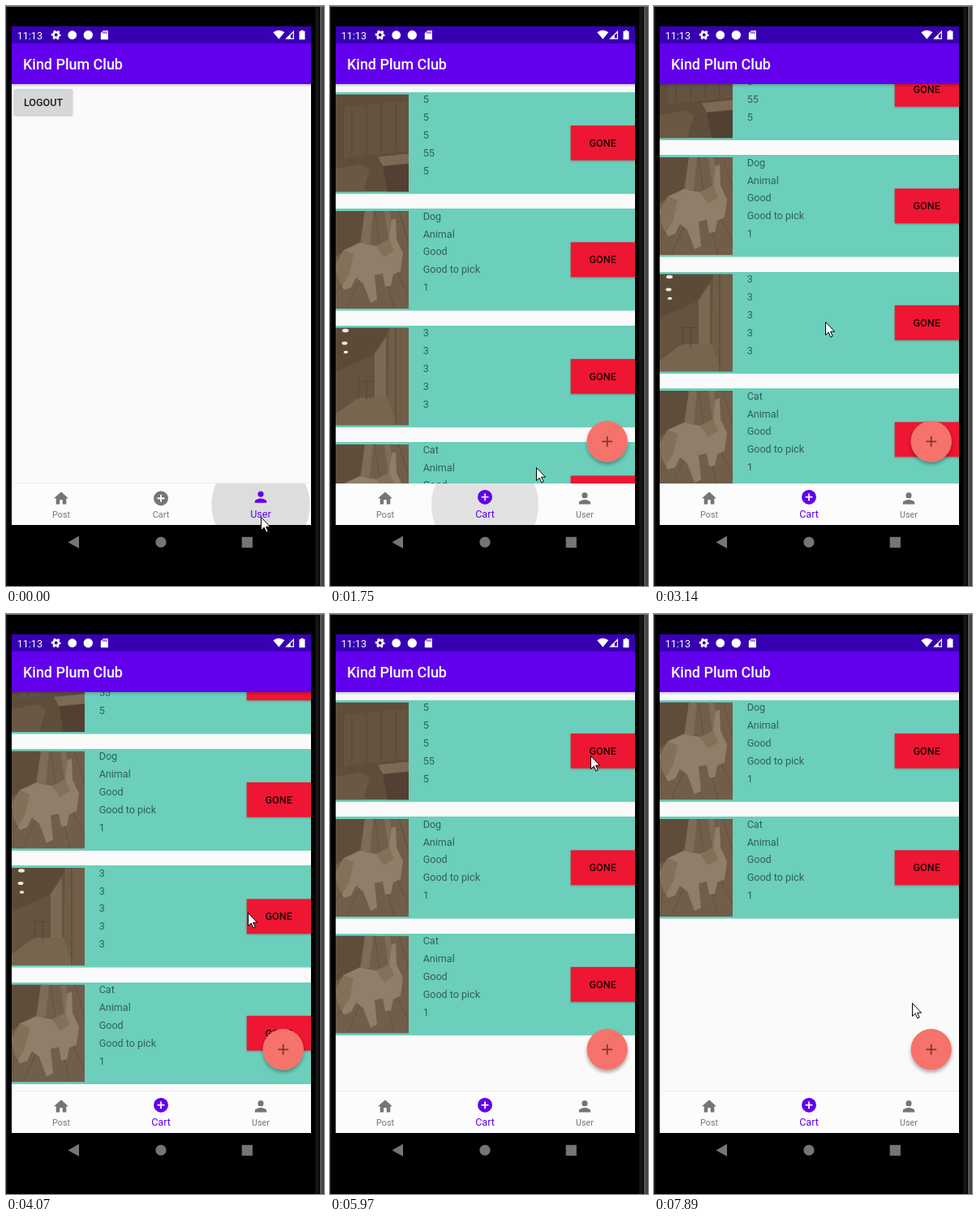
Recreate the animation shown at these times as an HTML page. Size 392 by 713 pixels, loop 8 s.

```html
<!DOCTYPE html>
<html lang="en">
<head>
<meta charset="utf-8">
<title>Sharing app</title>
<style>
  html, body { margin: 0; width: 100%; height: 100%; overflow: hidden; background: #000; }
  svg { display: block; }
  #stage { width: 392px; height: 713px; font: 12.55px Roboto, sans-serif; }
  .mid { text-anchor: middle; }
  .bold { font-weight: 500; }
  .soft { fill: rgba(0, 0, 0, .54); }
  .dark { fill: rgba(0, 0, 0, .87); }

  .anim, .tab, .ripple, .row { animation: 8s step-end infinite; }

  /* Screens */
  #logout { animation-name: logout; }
  #hello { animation-name: hello; }
  #cart { animation-name: cart; }
  @keyframes logout { 0% { opacity: 1 } 13.625%, 100% { opacity: 0 } }
  @keyframes hello { 0% { opacity: 0 } 13.625% { opacity: 1 } 20.375%, 100% { opacity: 0 } }
  @keyframes cart { 0% { opacity: 0 } 20.375%, 100% { opacity: 1 } }

  /* List */
  #scroll { animation-name: scroll; }
  #row0 { animation-name: row0; }
  #row1 { animation-name: row1; }
  #row2 { animation-name: row2; }
  #row3 { animation-name: row3; }
  @keyframes scroll {
    0% { transform: translateY(105.5px) }
    39.25% { transform: translateY(39.5px) }
    40.75% { transform: translateY(22px) }
    59.5%, 100% { transform: translateY(105.5px) }
  }
  @keyframes row0 { 0% { opacity: 1 } 93.625%, 100% { opacity: 0 } }
  @keyframes row1 {
    0% { transform: translateY(143.5px) }
    93.625%, 100% { transform: none }
  }
  @keyframes row2 {
    0% { transform: translateY(287px); opacity: 1 }
    59.5%, 100% { transform: translateY(287px); opacity: 0 }
  }
  @keyframes row3 {
    0% { transform: translateY(430.5px) }
    59.5% { transform: translateY(287px) }
    93.625%, 100% { transform: translateY(143.5px) }
  }

  /* Tabs */
  .tab { --on: 0; fill: color-mix(in srgb, #6200ee calc(var(--on) * 100%), #757575); }
  .tab text { font-size: calc(10.8px + 1.75px * var(--on)); }
  .tab g { transform: translateY(calc(var(--on) * -1.6px)); }
  #tabPost { animation-name: tabPost; }
  #tabCart { animation-name: tabCart; }
  #tabUser { animation-name: tabUser; }
  @keyframes tabPost { 0% { --on: 0 } 12.125% { --on: 1 } 18.5%, 100% { --on: 0 } }
  @keyframes tabCart { 0% { --on: 0 } 18.5%, 100% { --on: 1 } }
  @keyframes tabUser { 0% { --on: 1 } 12.125%, 100% { --on: 0 } }

  #ripPost { animation-name: ripPost; }
  #ripCart { animation-name: ripCart; }
  #ripUser { animation-name: ripUser; }
  @keyframes ripPost {
    0% { r: 0; opacity: 0 }
    10.625% { r: 25px; opacity: .12 }
    12.125% { r: 45px; opacity: .12 }
    13.625% { r: 60px; opacity: .1 }
    15.125% { r: 66px; opacity: .05 }
    20.375%, 100% { r: 66px; opacity: 0 }
  }
  @keyframes ripCart {
    0% { r: 0; opacity: 0 }
    18.5% { r: 16px; opacity: .12 }
    20.375% { r: 50px; opacity: .12 }
    21.875% { r: 66px; opacity: .1 }
    23.375% { r: 66px; opacity: .05 }
    24.875%, 100% { r: 66px; opacity: 0 }
  }
  @keyframes ripUser {
    0% { r: 60.7px; opacity: .12 }
    2% { r: 60.7px; opacity: .08 }
    3.5% { r: 60.7px; opacity: .04 }
    5%, 100% { r: 60.7px; opacity: 0 }
  }

  #pointer { animation-name: pointer; }
  @keyframes pointer {
    0% { transform: translate(314px, 628px) }
    2% { transform: translate(300px, 621px) }
    3.5% { transform: translate(230px, 612px) }
    5% { transform: translate(169px, 610px) }
    7% { transform: translate(118px, 610px) }
    8.875% { transform: translate(94px, 609px) }
    10.625% { transform: translate(70px, 612px) }
    12.125% { transform: translate(71px, 612px) }
    13.625% { transform: translate(120px, 611px) }
    15.125% { transform: translate(183px, 607px) }
    17% { transform: translate(192px, 609px) }
    18.5% { transform: translate(194px, 609px) }
    20.375% { transform: translate(212px, 596px) }
    21.875% { transform: translate(254px, 567px) }
    23.375% { transform: translate(300px, 545px) }
    24.875% { transform: translate(319px, 537px) }
    26.75% { transform: translate(317px, 530px) }
    28.25% { transform: translate(310px, 518px) }
    29.75% { transform: translate(299px, 509px) }
    31.625% { transform: translate(219px, 485px) }
    33.5% { transform: translate(213px, 484px) }
    37.375% { transform: translate(211px, 460px) }
    39.25% { transform: translate(211px, 388px) }
    40.75% { transform: translate(213px, 370px) }
    42.75% { transform: translate(214px, 367px) }
    47.875% { transform: translate(235px, 366px) }
    49.375% { transform: translate(275px, 366px) }
    50.875% { transform: translate(298px, 367px) }
    52.75% { transform: translate(309px, 375px) }
    54.625% { transform: translate(322px, 377px) }
    59.5% { transform: translate(320px, 378px) }
    61% { transform: translate(290px, 382px) }
    62.5% { transform: translate(248px, 384px) }
    64.375% { transform: translate(244px, 383px) }
    66.25% { transform: translate(209px, 347px) }
    68.125% { transform: translate(210px, 298px) }
    69.75% { transform: translate(252px, 225px) }
    71.25% { transform: translate(306px, 179px) }
    73% { transform: translate(318px, 174px) }
    74.625% { transform: translate(321px, 174px) }
    91.75% { transform: translate(203px, 237px) }
    93.625% { transform: translate(158px, 329px) }
    95.5% { transform: translate(200px, 395px) }
    97.125% { transform: translate(270px, 450px) }
    98.625%, 100% { transform: translate(318px, 478px) }
  }
</style>
</head>
<body>
<svg id="stage" viewBox="0 0 392 713">
  <defs>
    <clipPath id="body"><rect x="7" y="96" width="369" height="491"/></clipPath>
    <clipPath id="bar"><rect x="7" y="587" width="369" height="51"/></clipPath>
    <linearGradient id="shade" x2="0" y2="1">
      <stop stop-opacity=".18"/><stop offset="1" stop-opacity="0"/>
    </linearGradient>
    <filter id="lift" x="-20%" y="-20%" width="140%" height="150%">
      <feDropShadow dx="0" dy="1" stdDeviation=".8" flood-opacity=".25"/>
    </filter>
    <filter id="float" x="-30%" y="-30%" width="160%" height="170%">
      <feDropShadow dx="0" dy="3" stdDeviation="2.2" flood-opacity=".32"/>
    </filter>

    <symbol id="room" viewBox="0 0 90 120">
      <path fill="#5f4d3c" d="M0 0h90v120H0z"/>
      <path fill="#655341" d="M10 16l80-8v62l-80 8z"/>
      <path stroke="#594737" fill="none" d="M20 16v60M38 14v60M56 12v60M74 10v60"/>
      <path fill="#6a5845" d="M0 92l30-6 12 6-8 28H0z"/>
      <path fill="#7d6a55" d="M52 77l38-4v12l-32 3z"/>
      <path fill="#524132" d="M58 89l32-3v34H64z"/>
    </symbol>
    <symbol id="pet" viewBox="0 0 90 120">
      <path fill="#705d4a" d="M0 0h90v120H0z"/>
      <path fill="#5f4d3c" d="M0 0h36l-6 38L0 56z"/>
      <path fill="#7f6c57" d="M36 0h10l-4 40H31zM60 0h7l5 36h-7z"/>
      <path stroke="#62503e" fill="none" d="M48 0l6 40M78 0l12 40M0 100l20-24M14 120l18-40M72 120L62 80M90 104L74 72"/>
      <path fill="#8f7e69" d="M0 66l10-18 20-9 20 4 16-8 3-24 5-2 1 26 8 17-3 22-9 4-3 14-7 1-3-16-10 2 3 30-8 4-9-24-9-7-6 12-9 3-6-12z"/>
      <path fill="#827059" d="M0 66l10-18 12 5-5 24-9 15-6-10zM50 43l16-8 6 14-12 8z"/>
    </symbol>
    <symbol id="hall" viewBox="0 0 90 120">
      <path fill="#66533f" d="M0 0h90v120H0z"/>
      <path fill="#5c4a39" d="M0 0h68L46 34 0 54z"/>
      <path fill="#705d48" d="M66 0h24v120H76L64 92z"/>
      <path fill="#7c6953" d="M48 32l14-20v80H48z"/>
      <path fill="#78654f" d="M0 106l28-20h36l12 34H0z"/>
      <path stroke="#574534" fill="none" d="M74 0v120M28 66h18M28 62v26M38 64v26"/>
      <g fill="#f1e8d8"><ellipse cx="12" cy="3.5" rx="4" ry="2.2"/><ellipse cx="11" cy="19" rx="3.5" ry="2"/><ellipse cx="12.5" cy="30" rx="2.8" ry="1.7"/></g>
    </symbol>
  </defs>

  <!-- Device -->
  <path d="M0 0h392v713H0z"/>
  <path fill="#1b1b1b" d="M0 0h1.5v713H0z"/>
  <path fill="#141414" d="M381 0h5v713h-5z"/>
  <path fill="#585858" d="M387 0h2v713h-2z"/>
  <path fill="#444" d="M389 0h3v713h-3z"/>
  <path fill="#777" d="M0 0h392v1H0z"/>
  <path fill="#fafafa" d="M7 96h369v491H7z"/>
  <path fill="#eee" d="M7 586h369v1H7z"/>

  <!-- Screens -->
  <g id="logout" class="anim">
    <rect x="10" y="102" width="72" height="32" rx="1.8" fill="#d6d7d7" filter="url(#lift)"/>
    <text class="mid bold dark" x="46" y="122.7">LOGOUT</text>
  </g>
  <text id="hello" class="anim soft" x="6.6" y="110">Hello blank fragment</text>
  <g id="cart" class="anim" clip-path="url(#body)">
    <g id="scroll" class="anim"></g>
    <circle cx="341.7" cy="535.3" r="25.2" fill="#f5736a" filter="url(#float)"/>
    <path stroke="#7b3935" stroke-width="1.8" d="M335.3 535.3h12.8M341.7 528.9v12.8"/>
  </g>

  <!-- Top bars -->
  <path fill="url(#shade)" d="M7 96h369v4H7z"/>
  <path fill="#3700b3" d="M7 25h369v21H7z"/>
  <path fill="#6200ee" d="M7 46h369v50H7z"/>
  <text class="bold" x="21" y="78.3" fill="#fff" font-size="17.95">Kind Plum Club</text>
  <g fill="#fff">
    <text x="13.7" y="40.6">11:13</text>
    <g fill="none" stroke="#fff">
      <circle cx="61.7" cy="35.6" r="3.3" stroke-width="2.6"/>
      <circle cx="61.7" cy="35.6" r="5.1" stroke-width="1.8" stroke-dasharray="2.7 2.64" stroke-dashoffset="1.3"/>
    </g>
    <circle cx="81.7" cy="35.7" r="5.4"/>
    <circle cx="101.3" cy="35.7" r="5.7"/>
    <path d="M120 30.2h5.8v11h-9v-8z"/>
    <path stroke="#3700b3" d="M119.8 31.5v2.4M121.8 31.5v2.4M123.8 31.5v2.4"/>
    <path d="M329.3 32.2q7-5 14 0l-7 8.6z"/>
    <path d="M355 30v10.8h-10.8z"/>
    <path fill="#3700b3" d="M353.8 33v6.6h-3v-3.6z"/>
    <path d="M363.5 31v-1.2h3V31h2v10.3h-7V31z"/>
  </g>

  <!-- Bottom bars -->
  <path fill="#fcfcfc" d="M7 587h369v51H7z"/>
  <g id="tabs" clip-path="url(#bar)"></g>
  <g fill="#757575">
    <path d="M90 651.5v15.3l-13.6-7.6z"/>
    <circle cx="191" cy="659.2" r="6.6"/>
    <path d="M290.7 652.7h13.2v13.2h-13.2z"/>
  </g>

  <path id="pointer" class="anim" fill="#fff" stroke="#000" d="M.5.5v16l3.7-3.4 2.6 5.9 2.4-1.1-2.6-5.7h5z"/>
</svg>

<script>
  const byId = id => document.getElementById(id);

  const cards = [
    ['room', '5', '5', '5', '55', '5'],
    ['pet', 'Dog', 'Animal', 'Good', 'Good to pick', '1'],
    ['hall', '3', '3', '3', '3', '3'],
    ['pet', 'Cat', 'Animal', 'Good', 'Good to pick', '1'],
  ];

  const card = ([photo, ...lines], i) => `
    <g id="row${i}" class="row">
      <rect x="7" width="369" height="125.5" fill="#6bcfbb"/>
      <use href="#${photo}" x="7" y="3" width="90" height="120"/>
      ${lines.map((s, n) => `<text class="soft" x="114.7" y="${13.8 + 21.8 * n}">${s}</text>`).join('')}
      <rect x="296.7" y="41.4" width="79.3" height="42.8" fill="#ee1433" filter="url(#lift)"/>
      <text class="mid bold dark" x="336.2" y="67.3">GONE</text>
    </g>`;

  const tabs = [
    ['Post', 68, 'M10 20v-6h4v6h5v-8h3L12 3 2 12h3v8z'],
    ['Cart', 191, 'M12 2a10 10 0 1 0 0 20 10 10 0 0 0 0-20zm5 11h-4v4h-2v-4H7v-2h4V7h2v4h4z'],
    ['User', 314, 'M12 12a4 4 0 1 0 0-8 4 4 0 0 0 0 8zm0 2c-2.7 0-8 1.3-8 4v2h16v-2c0-2.7-5.3-4-8-4z'],
  ];

  const tab = ([name, x, icon]) => `
    <circle id="rip${name}" class="ripple" cx="${x}" cy="613"/>
    <g id="tab${name}" class="tab">
      <g><path transform="translate(${x - 10.76} 594.5) scale(.897)" d="${icon}"/></g>
      <text class="mid" x="${x}" y="628.8">${name}</text>
    </g>`;

  byId('scroll').innerHTML = cards.map(card).join('');
  byId('tabs').innerHTML = tabs.map(tab).join('');
</script>
</body>
</html>
```
